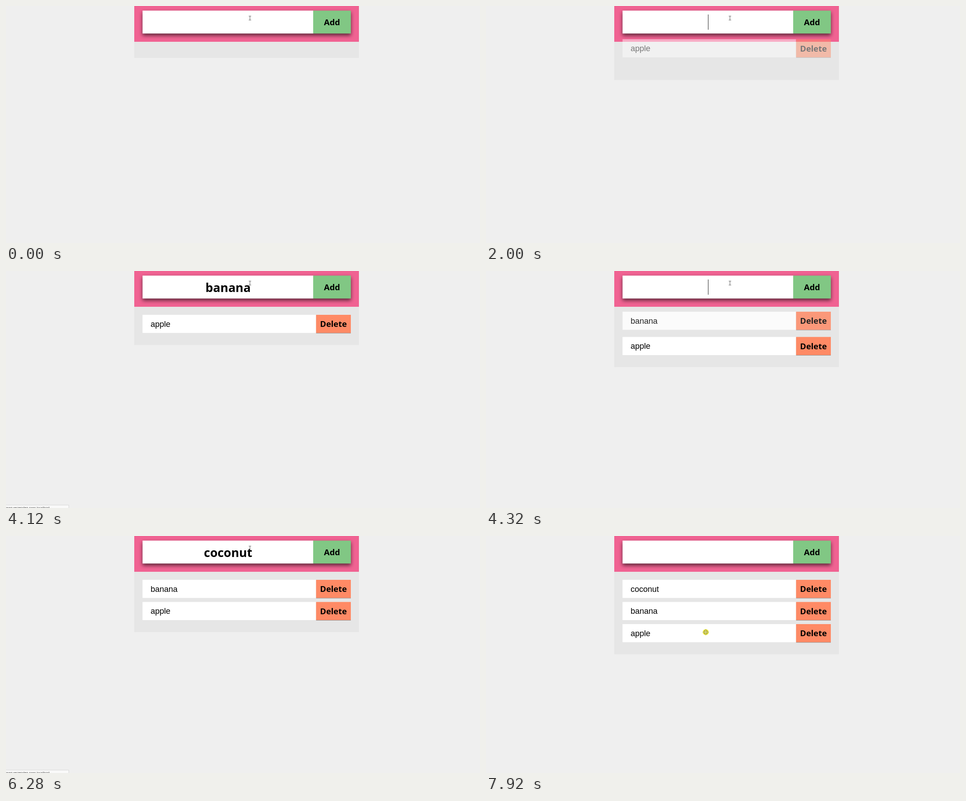
An HTML page for the animation above (8 s loop, 1057 by 530 pixels).

```html
<!DOCTYPE html>
<html lang="en">
<head>
<meta charset="utf-8">
<title>Shopping list</title>
<style>
  html, body { margin: 0; width: 100%; height: 100%; overflow: hidden; background: #efefef; }
  svg { display: block; width: 1057px; height: 530px; }
  .bold { font-family: "Noto Sans", "Open Sans", sans-serif; font-weight: 700; font-size: 18.35px; text-anchor: middle; }
  .typed { font-size: 26.85px; }
  .item { font: 18px "Liberation Sans", Arial, sans-serif; }
  .tip { font: 7px "Open Sans", "Noto Sans", sans-serif; fill: #444; text-anchor: end; }
</style>
</head>
<body>
<svg viewBox="0 0 1057 530" xmlns="http://www.w3.org/2000/svg">
  <defs>
    <filter id="soft" x="-10%" y="-60%" width="120%" height="220%"><feGaussianBlur stdDeviation="4.5"/></filter>
    <filter id="thin" x="-10%" y="-10%" width="120%" height="120%"><feGaussianBlur stdDeviation="0.6"/></filter>
    <clipPath id="head"><rect x="286" width="501" height="80"/></clipPath>
  </defs>
  <rect width="1057" height="530" fill="#efefef"/>
  <rect id="panel" x="286" y="80" width="501" height="36" fill="#e6e6e6"/>
  <g clip-path="url(#head)">
    <rect x="286" width="501" height="80" fill="#f06292"/>
    <rect x="304.5" y="14.5" width="464.5" height="51.5" fill="#000" opacity=".6" filter="url(#soft)"/>
  </g>
  <rect x="304.5" y="10.3" width="380.7" height="51.2" fill="#fff"/>
  <rect x="685" y="10.3" width="84" height="51.2" fill="#81c784"/>
  <text class="bold" x="727" y="43.3">Add</text>
  <text class="bold typed" id="typed" x="495.25" y="47"></text>
  <rect id="caret" y="19" width="1" height="34" fill="#222"/>
  <g id="list"></g>
  <g id="status">
    <rect x="-1" y="523.5" width="141" height="8" fill="#f9f9f9" stroke="#d8d8d8"/>
    <text class="tip" x="97.5" y="532">Aanvraag verzenden naar localhost</text>
  </g>
  <path id="beam" d="M-2.5 -4.5H-.7L0 -4L.7 -4.5H2.5M0 -4V4M-2.5 4.5H-.7L0 4L.7 4.5H2.5" fill="none" stroke="#555"/>
  <g id="move">
    <circle r="6.8" fill="#f1ee4e"/>
    <path d="M0 -6L2.5 -3.4H1V-1H3.4V-2.5L6 0L3.4 2.5V1H1V3.4H2.5L0 6L-2.5 3.4H-1V1H-3.4V2.5L-6 0L-3.4 -2.5V-1H-1V-3.4H-2.5Z" fill="#f7f6a8" stroke="#85831c" stroke-width=".9"/>
  </g>
</svg>
<script>
const LOOP = 8000, STEP = 40, ROW = 49.5, DROP = 45, DROP_TIME = 300;

// When each letter is typed, when the request shows, when the item is added
const words = [
  { text: 'apple', keys: [600, 840, 960, 1360, 1520], send: 1840, add: 1920 },
  { text: 'banana', keys: [2560, 2760, 2880, 3080, 3240, 3800], send: 4120, add: 4160 },
  { text: 'coconut', keys: [4640, 4840, 5080, 5440, 5680, 5920, 6080], send: 6280, add: 6440 }
];
// The caret flips on and off at these times
const blinks = [400, 960, 1360, 1600, 1920, 2440, 2560, 2960, 3440, 4000,
  4160, 5200, 5720, 6240, 6440, 6920, 7400, 7920];
// Pointer path: time, x, y
const path = [[6760, 544, 27], [7240, 496, 150], [7880, 490, 215]];

const el = id => document.getElementById(id);
const [panel, typed, caret, list, status, beam, move] =
  ['panel', 'typed', 'caret', 'list', 'status', 'beam', 'move'].map(el);
const show = (node, on) => node.setAttribute('visibility', on ? 'visible' : 'hidden');
const clamp = v => Math.min(1, Math.max(0, v));
const countBefore = (times, t) => times.filter(k => k <= t).length;

list.innerHTML = words.map(w => `<g>
  <rect x="691.5" y="1" width="77.5" height="40.5" fill="#000" opacity=".35" filter="url(#thin)"/>
  <rect x="304.5" width="387" height="40.5" fill="#fff"/>
  <rect x="691.5" width="77.5" height="40.5" fill="#ff8a65"/>
  <text class="item" x="322.5" y="26.6">${w.text}</text>
  <text class="bold" x="730.2" y="27.3">Delete</text></g>`).join('');
const rows = [...list.children];

// cubic-bezier(.25, .1, .25, 1)
function ease(x) {
  const curve = (a, b, s) => 3 * a * s * (1 - s) ** 2 + 3 * b * s * s * (1 - s) + s ** 3;
  let lo = 0, hi = 1;
  for (let i = 0; i < 20; i++) {
    const mid = (lo + hi) / 2;
    if (curve(.25, .25, mid) < x) lo = mid; else hi = mid;
  }
  return x >= 1 ? 1 : curve(.1, 1, lo);
}

function pointerAt(t) {
  let [, x, y] = path[0];
  for (let i = 1; i < path.length; i++) {
    const [t0, x0, y0] = path[i - 1], [t1, x1, y1] = path[i];
    if (t < t0) break;
    const p = clamp((t - t0) / (t1 - t0));
    x = x0 + (x1 - x0) * p;
    y = y0 + (y1 - y0) * p;
  }
  return [x, y];
}

function draw(t) {
  const added = countBefore(words.map(w => w.add), t);
  const word = words[added];
  typed.textContent = word ? word.text.slice(0, countBefore(word.keys, t)) : '';
  const width = typed.textContent ? typed.getComputedTextLength() : 0;
  caret.setAttribute('x', Math.floor(495.25 + width / 2));
  show(caret, countBefore(blinks, t) % 2);
  show(status, word && t >= word.send);

  panel.setAttribute('height', 36 + ROW * added);
  rows.forEach((row, i) => {
    const p = ease(clamp((t - words[i].add + 4) / DROP_TIME));
    show(row, i < added);
    row.setAttribute('opacity', p);
    row.setAttribute('transform', `translate(0 ${98 + ROW * (added - 1 - i) - DROP * (1 - p)})`);
  });

  const [x, y] = pointerAt(t);
  const inField = y < 61.5;
  show(beam, inField);
  show(move, !inField);
  (inField ? beam : move).setAttribute('transform', `translate(${x} ${y})`);
}

const start = performance.now();
function frame() {
  const t = (performance.now() - start) % LOOP;
  draw(Math.floor(t / STEP) * STEP);
  requestAnimationFrame(frame);
}
draw(0);
requestAnimationFrame(frame);
</script>
</body>
</html>
```
